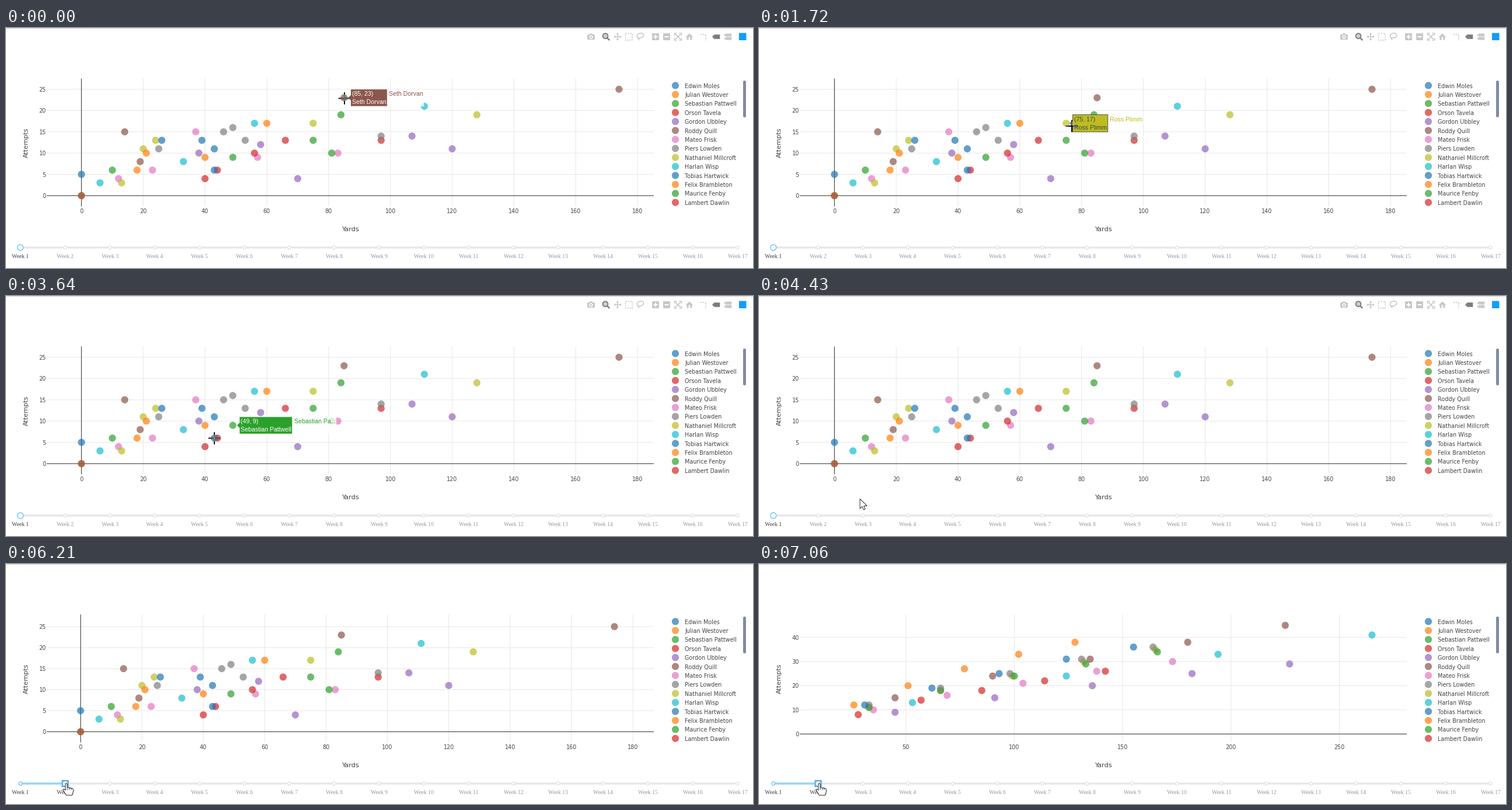
A matplotlib script that plays this animation: 1280x411 px, repeating every 8000 ms.

```python
import math
import numpy as np
import matplotlib.pyplot as plt
from matplotlib.animation import FuncAnimation
from matplotlib.collections import LineCollection
from matplotlib.colors import to_rgb
from matplotlib.patches import Circle, Ellipse, FancyBboxPatch, Polygon, Rectangle

W, H, DPI = 1280, 411, 100
STEP, LOOP = 40, 8000
PT = 72 / DPI
LEFT, RIGHT, TOP, BOTTOM = 70, 1110, 86.5, 305.5
INK = "#444444"
CLICK, MOVED, RESCALE, SWAP = 5720, 5800, 6120, 7040

BLUE, ORANGE, GREEN, RED, PURPLE, BROWN, PINK, GRAY, OLIVE, TEAL = PALETTE = (
    "#1f77b4", "#ff7f0e", "#2ca02c", "#d62728", "#9467bd",
    "#8c564b", "#e377c2", "#7f7f7f", "#bcbd22", "#17becf")

PLAYERS = ["Edwin Moles", "Julian Westover", "Sebastian Pattwell", "Orson Tavela",
           "Gordon Ubbley", "Roddy Quill", "Mateo Frisk", "Piers Lowden",
           "Nathaniel Millcroft", "Harlan Wisp", "Tobias Hartwick",
           "Felix Brambleton", "Maurice Fenby", "Lambert Dawlin"]
OTHERS = {(85, 23): "Seth Dorvan", (84, 19): "Owen Tilbray",
          (75, 17): "Ross Plimm", (75, 13): "Saul Brenley"}

# colour: leader's total after two weeks, then (yards, attempts) of week one
TRACES = {
    PURPLE: ((227, 29), [(38, 10), (58, 12), (70, 4), (107, 14), (120, 11)]),
    PINK: ((173, 30), [(12, 4), (23, 6), (37, 15), (57, 9), (83, 10)]),
    OLIVE: ((165, 35), [(13, 3), (20, 11), (24, 13), (75, 17), (128, 19)]),
    ORANGE: ((128, 38), [(0, 0), (18, 6), (21, 10), (40, 9), (60, 17)]),
    GREEN: ((166, 34), [(10, 6), (49, 9), (75, 13), (81, 10), (84, 19)]),
    RED: ((142, 26), [(40, 4), (44, 6), (56, 10), (66, 13), (97, 13)]),
    GRAY: ((164, 36), [(25, 11), (46, 15), (49, 16), (53, 13), (97, 14)]),
    TEAL: ((265, 41), [(6, 3), (33, 8), (56, 17), (111, 21)]),
    BROWN: ((225, 45), [(0, 0), (14, 15), (19, 8), (85, 23), (174, 25)]),
    BLUE: ((155, 36), [(0, 5), (26, 13), (39, 13), (43, 11), (43, 6)]),
}
COLORS = [c for c, (_, pts) in TRACES.items() for _ in pts]
WEEK1 = [p for _, pts in TRACES.values() for p in pts]


def second_week():
    """Spread each colour's players evenly below its leader."""
    out = []
    for (yards, tries), pts in TRACES.values():
        for f in np.linspace(0.2, 1, len(pts)):
            out.append((round(yards * f), round(tries * f ** 0.7)))
    return out


WEEK2 = second_week()

# pointer stops: time, x, y
PATH = np.array([
    (200, 580, 120.5), (630, 576, 150), (1280, 576, 150), (1720, 536, 168),
    (2200, 536, 168), (2630, 529, 192), (3250, 529, 192), (3640, 357, 243.5),
    (4120, 180, 345), (4400, 173, 347.5), (5270, 103.3, 375.5)])

ARROW = [(0, 0), (0, 16.5), (3.8, 13), (6.3, 18.5), (9, 17.3), (6.6, 12), (12, 11.8)]
HAND = [(-1.5, 1), (0, 0), (1.5, 1), (1.7, 7), (11, 9), (12, 11), (12, 14), (10, 20.5),
        (0, 20.5), (-6, 11), (-4, 10), (-1.5, 12)]

fig = plt.figure(figsize=(W / DPI, H / DPI), dpi=DPI, facecolor="white")
ax = fig.add_axes([0, 0, 1, 1])
ax.set_xlim(0, W)
ax.set_ylim(H, 0)
ax.axis("off")
plot_box = Rectangle((LEFT, TOP), RIGHT - LEFT, BOTTOM - TOP, transform=ax.transData)


def label(x, y, s, px, color=INK, font="DejaVu Sans", z=3, **kw):
    kw = {"ha": "left", "va": "center_baseline", **kw}
    return ax.text(x, y, s, fontsize=px * PT, color=color, family=font, zorder=z, **kw)


def line(xs, ys, color, px, z=3, **kw):
    kw = {"solid_capstyle": "butt", "snap": False, **kw}
    return ax.plot(xs, ys, color=color, lw=px * PT, zorder=z, **kw)[0]


def add(patch, z=3):
    patch.set_zorder(z)
    patch.set_snap(False)
    return ax.add_patch(patch)


def box(x, y, w, h, z=3, **kw):
    return add(Rectangle((x, y), w, h, **{"lw": 0, **kw}), z)


def rounded(x, y, w, h, r, color, z=3):
    return add(FancyBboxPatch((x, y), w, h, boxstyle=f"round,pad=0,rounding_size={r}",
                              fc=color, lw=0), z)


def shape(pts, z=3, **kw):
    return add(Polygon(pts, closed=True, **{"lw": 0, **kw}), z)


def ring(x, y, r, edge, px, z=3, fill="white"):
    return add(Circle((x, y), r, fc=fill, ec=edge, lw=px * PT), z)


def dots(xy, colors, z=3):
    return ax.scatter(*np.transpose(xy), s=(12.2 * PT) ** 2, c=colors, alpha=0.7,
                      linewidths=0, zorder=z)


def week_label(i, color):
    return label(stop(i), 394, f"Week {i + 1}", 9.6, color, "Liberation Serif",
                 ha="center", va="baseline")


def stop(i):
    return 24.6 + 76.8 * i


def make_modebar():
    c, dark, y = "#c8c8c8", "#7c7c7c", 15
    # camera, magnifier
    parts = [rounded(996, 11, 13, 9, 1.5, c), box(1000, 9.5, 5, 3, color=c),
             ring(1002.5, 15.4, 2.4, "white", 1.5, fill=c),
             ring(1027, 13.7, 4.4, dark, 1.9, fill="#d0d0d0"),
             line([1030, 1034.3], [17, 21], dark, 2.4)]
    # pan
    for a in np.arange(4) * math.pi / 2:
        d = np.array([math.cos(a), math.sin(a)])
        side = 2.6 * d[::-1] * (1, -1)
        mid = np.array([1048, y])
        parts += [shape([mid + 6.7 * d, mid + 3.7 * d + side, mid + 3.7 * d - side], color=c),
                  line(*zip(mid, mid + 5 * d), c, 1.5)]
    # box select, lasso
    parts += [box(1061.5, 9.3, 11.5, 11.5, fc="none", ec=c, lw=1.5 * PT, ls=(0, (1.6, 1.2))),
              add(Ellipse((1087, 13), 11.5, 8, angle=-15, fc="none", ec=c, lw=1.6 * PT)),
              line([1083, 1083.5, 1085.5], [16, 18.5, 20.5], c, 1.6)]
    # zoom in and out
    for x in (1113, 1132):
        parts += [rounded(x - 6, 9, 12, 12, 1.2, c), line([x - 3.5, x + 3.5], [y, y], "white", 2)]
    parts.append(line([1113, 1113], [11.5, 18.5], "white", 2))
    # autoscale
    for s in (-1, 1):
        parts.append(line([1147, 1156], [y - 4.5 * s, y + 4.5 * s], c, 1.6))
        for k in (-1, 1):
            u, v = 1151.5 + 6 * s, y + 6 * k
            parts.append(line([u - 4 * s, u, u], [v, v, v - 4 * k], c, 1.5))
    # home, spike lines
    parts += [shape([(1164.5, 15.5), (1171, 9.3), (1177.5, 15.5)], color=c),
              box(1166.5, 15, 3.2, 5.5, color=c), box(1172.3, 15, 3.2, 5.5, color=c),
              line([1190, 1199], [11, 11], c, 1.6, ls=(0, (1.5, 1))),
              line([1199, 1199], [12, 21], c, 1.6, ls=(0, (1.5, 1)))]
    # hover tags
    for x, m, h, col in ((1210, 15, 3.8, dark), (1230, 12, 2.5, c), (1230, 18, 2.5, c)):
        parts += [shape([(x, m), (x + 3.5, m - h), (x + 3.5, m + h)], color=col),
                  box(x + 3.3, m - h, 10, 2 * h, color=col)]
    parts.append(box(1256, 8.5, 12.5, 12.5, color="#119dff"))
    return parts


line([0, W], [0.5, 0.5], "#cfcfcf", 1)
label(590, 343.5, "Yards", 11.4, ha="center")
label(35, 196, "Attempts", 11.3, ha="center", va="center", rotation=90)
rows = 98.5 + 15.4 * np.arange(len(PLAYERS))
dots([(1147, y) for y in rows], [PALETTE[i % 10] for i in range(len(rows))])
for name, y in zip(PLAYERS, rows):
    label(1163, y, name, 9.7)
rounded(1263, 90, 5, 63, 2.4, "#808ba4")
line([stop(0), stop(16)], [376, 376], "#e6e6e6", 3.2)
for i in range(2, 17):
    ring(stop(i), 376, 2.7, "#e4e4e4", 1.4, z=4)
    week_label(i, "#999999")
modebar = make_modebar()
live = []


def keep(*artists):
    live.extend(artists)
    return artists[-1]


def pointer(t):
    return np.array([np.interp(t, PATH[:, 0], PATH[:, k]) for k in (1, 2)])


def ease(p):
    p = min(max(p, 0), 1)
    return 4 * p ** 3 if p < 0.5 else 1 - 4 * (1 - p) ** 3


def ticks(lo, hi, most):
    d = next(s for s in (5, 10, 20, 50) if s >= (hi - lo) / most)
    return np.arange(math.ceil(lo / d), math.floor(hi / d) + 1) * d


def scales(t):
    p = ease((t - RESCALE) / 500)
    mix = lambda a, b: a + (b - a) * p
    x0, x1 = mix(-11.2, 1.08), mix(185.26, 281.06)
    y0, y1 = mix(-2.524, -3.48), mix(27.52, 49.48)
    sx = lambda v: LEFT + (v - x0) / (x1 - x0) * (RIGHT - LEFT)
    sy = lambda v: BOTTOM - (v - y0) / (y1 - y0) * (BOTTOM - TOP)
    return sx, sy, ticks(x0, x1, 10), ticks(y0, y1, 6.475)


def draw_axes(sx, sy, xs, ys):
    across = {v: [(LEFT, sy(v)), (RIGHT, sy(v))] for v in ys}
    upright = {v: [(sx(v), TOP), (sx(v), BOTTOM)] for v in xs}
    grid = [s for d in (across, upright) for v, s in d.items() if v]
    zero = [d[0] for d in (across, upright) if 0 in d]
    for segs, color, z in ((grid, "#e9e9e9", 1), (zero, "#383838", 1.5)):
        keep(ax.add_collection(LineCollection(
            segs, colors=color, linewidths=1.1 * PT, zorder=z, snap=False)))
    for v in xs:
        keep(label(sx(v), 313.3, str(v), 9.7, ha="center"))
    for v in ys:
        keep(label(68.7, sy(v), str(v), 9.7, ha="right"))


def draw_hover(x, y, point, color):
    name = OTHERS.get(point, PLAYERS[PALETTE.index(color)])
    fg, edge = (INK, INK) if color == OLIVE else ("white", "white")
    font = {"font": "Liberation Sans", "va": "baseline", "z": 7}
    left, top, bottom = x + 11.3, y - 14.7, y + 14.7
    a = label(left + 2.5, y - 3.2, f"({point[0]}, {point[1]})", 10.5, fg, **font)
    b = label(left + 2.5, y + 10.7, name, 10.5, fg, **font)
    right = left + 4 + max(s.get_window_extent().width for s in (a, b))
    short = name if len(name) <= 15 else name[:12] + "..."
    tag = label(right + 2.8, y - 3.2, short, 10.5, color, **font)
    wide = tag.get_window_extent().width + 4
    veil = box(right, top, wide, bottom - top, z=5, fc="white", alpha=0.8)
    pts = [(left - 4.8, y), (left, y - 4.8), (left, top), (right, top),
           (right, bottom), (left, bottom), (left, y + 4.8)]
    keep(a, b, tag, veil, shape(pts, z=6, fc=color, ec=edge, lw=0.9 * PT))
    return pts


def find_hover(at, xy):
    gap = np.hypot(*(xy - at).T)
    i = int(gap.argmin())
    return i if gap[i] < 20 and at[1] < BOTTOM else None


def invert(color):
    return tuple(1 - v for v in to_rgb(color))


def draw_cross(at, xy, card, tint):
    # the crosshair shows the negative of whatever lies below it
    n, b = 0.95, 10.3
    quarter = np.array([(n, -b), (n, -n), (b, -n)])
    turn = np.array([(0, 1), (-1, 0)])
    arms = []
    for _ in range(4):
        arms.extend(quarter)
        quarter = quarter @ turn
    cross = keep(shape(np.add(arms, at), z=8, fc="black"))
    under = [dots(xy, [invert(c) for c in COLORS], z=9)]
    if card:
        under.append(shape(card, z=10, fc=invert(tint)))
    for artist in under:
        artist.set_clip_path(cross)
        keep(artist)


def draw_slider(t):
    moved = t >= MOVED
    if moved:
        keep(line([stop(0), stop(1)], [376, 376], "#91d5ff", 3.2, z=3.5),
             ring(stop(0), 376, 2.9, "#7cc9fb", 1.5, z=4),
             box(stop(1) - 5.3, 370.7, 10.6, 10.6, z=5, fc="#d6ecfd", ec="#3d94e8",
                 lw=1.4 * PT),
             ring(stop(1), 376, 4.6, "#69b9f7", 1.6, z=5.5))
    else:
        keep(ring(stop(0), 376, 5, "#7cc9fb", 1.6, z=4),
             ring(stop(1), 376, 2.7, "#e4e4e4", 1.4, z=4))
    keep(week_label(0, "#404040"), week_label(1, "#404040" if moved else "#999999"))
    if CLICK <= t < CLICK + 160:
        glow = 0.85 - 0.5 * (t - CLICK) / 160
        keep(add(Circle((103, 376), 12.3, fc="#ffff66", lw=0, alpha=glow), 6))


def draw(i):
    while live:
        live.pop().remove()
    t = i * STEP
    sx, sy, xs, ys = scales(t)
    draw_axes(sx, sy, xs, ys)

    week = WEEK2 if t >= SWAP else WEEK1
    xy = np.array([(sx(a), sy(b)) for a, b in week])
    keep(dots(xy, COLORS)).set_clip_path(plot_box)
    draw_slider(t)
    for part in modebar:
        part.set_alpha(min(max((5000 - t) / 300, 0), 1))

    # the label lags a little behind the pointer
    hit = find_hover(pointer(t - 80), xy)
    card = tint = None
    if hit is not None:
        tint = COLORS[hit]
        card = draw_hover(*xy[hit], week[hit], tint)

    at = pointer(t)
    if at[1] < BOTTOM:
        draw_cross(at, xy, card, tint)
    elif at[1] < 368:
        keep(shape(np.add(ARROW, at), z=8, fc="white", ec="#222222", lw=0.95 * PT))
    else:
        keep(shape(np.add(HAND, at), z=8, fc="white", ec="#222222", lw=PT))
        for dx in (1.7, 5, 8.3):
            keep(line(at[0] + [dx, dx], at[1] + [7.5, 11.5], "#222222", 0.8, z=9))
    return live


anim = FuncAnimation(fig, draw, frames=LOOP // STEP, interval=STEP, repeat=True,
                     repeat_delay=0, blit=False, init_func=lambda: draw(0))
plt.show()
```
